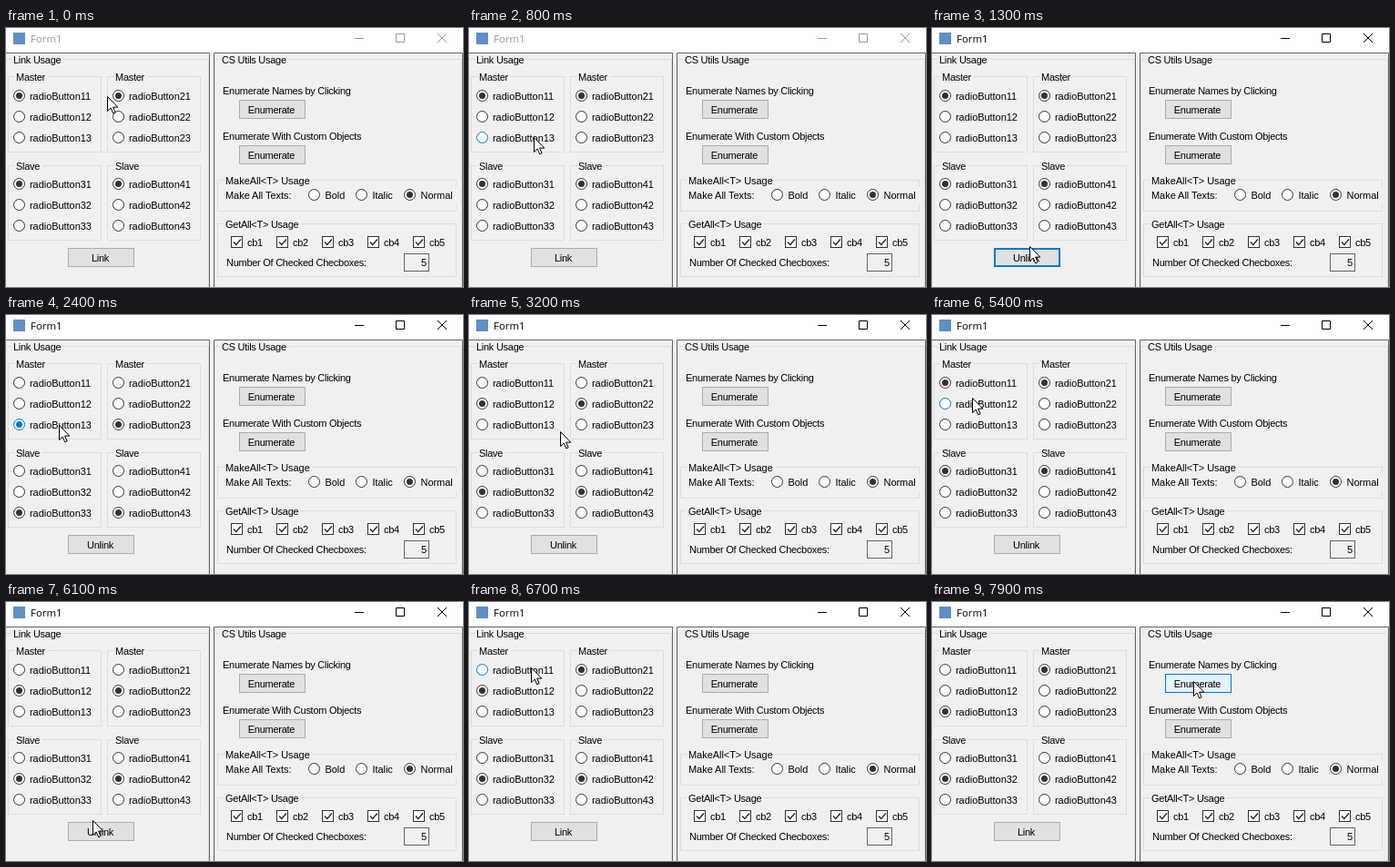
Recreate the animation shown at these times as an HTML page. Size 502 by 285 pixels, loop 8000 ms.

```html
<!DOCTYPE html>
<html lang="en">
<head>
<meta charset="utf-8">
<title>Form1</title>
<style>
  html, body { margin: 0; width: 100%; height: 100%; overflow: hidden; background: #f0f0f0; }
  svg { display: block; width: 502px; height: 285px; }
  text { font: 11px "Liberation Sans", Arial, sans-serif; letter-spacing: -.27px; fill: #000; white-space: pre; }
  .wide { letter-spacing: -.05px; }
  .title { font: 11.4px "Open Sans", "Noto Sans", sans-serif; letter-spacing: 0; }
  .legend { paint-order: stroke; stroke: #f0f0f0; stroke-width: 5px; }
  .mid { text-anchor: middle; }
  .line { fill: none; stroke: #dcdcdc; }
  .panel { fill: none; stroke: #646464; }
  .glyph { fill: none; stroke: #000; }
  .tick { fill: none; stroke: #222; stroke-width: 1.3px; }
  .inactive .title { fill: #999; }
  .inactive .glyph { stroke: #999; }
  .ring { fill: #fff; stroke: #333; }
  .dot { fill: #333; visibility: hidden; }
  .on .dot { visibility: visible; }
  .hot .ring { stroke: #0078d7; }
  .hot .dot { fill: #0078d7; }
  .face { fill: #e1e1e1; stroke: #adadad; }
  .hot .face { fill: #e5f1fb; stroke: #0078d7; }
  .halo { fill: none; stroke: #0078d7; stroke-width: 2px; visibility: hidden; }
  .focus:not(.hot) .halo { visibility: visible; }
  .cursor { fill: #fff; stroke: #000; }
</style>
</head>
<body>
<svg id="stage" viewBox="0 0 502 285"></svg>
<script>
const LOOP = 8000, STEP = 100;
const stage = document.getElementById('stage');

function add(tag, attrs, parent = stage) {
  const el = document.createElementNS('http://www.w3.org/2000/svg', tag);
  for (const k in attrs) el.setAttribute(k, attrs[k]);
  parent.append(el);
  return el;
}
const rect = (x, y, width, height, cls, parent) =>
  add('rect', { x: x + .5, y: y + .5, width, height, class: cls }, parent);
const path = (d, cls, parent) => add('path', { d, class: cls }, parent);
function label(str, x, y, cls = '', parent) {
  const el = add('text', { x, y, class: cls }, parent);
  el.textContent = str;
  return el;
}
function group(name, x, y, w, h, cls = '') {
  rect(x, y, w, h, 'line');
  label(name, x + 9, y + 5, 'legend ' + cls);
}
function radio(name, x, y, gap = 11.5) {
  const el = add('g', {});
  add('circle', { cx: x, cy: y, r: 6, class: 'ring' }, el);
  add('circle', { cx: x, cy: y, r: 3.5, class: 'dot' }, el);
  label(name, x + gap, y + 4.5, 'wide', el);
  return { el, x, y, box: [x - 7, y - 8, 86, 17] };
}
function button(name, x, y) {
  const el = add('g', {});
  rect(x, y, 72, 20, 'face', el);
  rect(x + .5, y + .5, 71, 19, 'halo', el);
  const text = label(name, x + 35.5, y + 14.5, 'mid', el);
  return { el, text, x, y: y + 9, box: [x, y, 73, 21] };
}

// Title bar
const bar = add('g', {});
add('rect', { width: 502, height: 27, fill: '#fff' }, bar);
add('rect', { x: 8, y: 5, width: 13, height: 13, fill: '#5f8fc4' }, bar);
label('Form1', 27, 16, 'title', bar);
path('M383 11.5h10M428.5 6.5h9v9h-9zM474 6l10 10M484 6l-10 10', 'glyph', bar);

// Panels
path('M0 34.5H222.5V285', 'line');
path('M229.5 285V34.5H500.5V285', 'line');
path('M0 27.5H223.5V285', 'panel');
path('M228.5 285V27.5H501.5V285', 'panel');
label('Link Usage', 8, 39, 'legend');
label('CS Utils Usage', 237, 39, 'legend');

// Left: two masters above two slaves
const groups = [];
for (let g = 0; g < 4; g++) {
  const col = g % 2, row = g >> 1;
  group(row ? 'Slave' : 'Master', 2 + col * 109, 53 + row * 98, 102, 83 - row);
  groups.push([0, 1, 2].map(i => Object.assign(
    radio(`radioButton${g + 1}${i + 1}`, 14.5 + col * 109, 74.5 + row * 97 + i * 23), { g, i })));
}
const [[r11, r12, r13], [r21], , [r41, , r43]] = groups;
const link = button('Link', 68, 242);

// Right: utilities
label('Enumerate Names by Clicking', 238, 73);
const names = button('Enumerate', 256, 79);
label('Enumerate With Custom Objects', 238, 123);
const objects = button('Enumerate', 256, 129);

group('MakeAll<T> Usage', 232, 167, 262, 34, 'wide');
add('rect', { x: 436, y: 175, width: 60, height: 19, fill: '#f0f0f0' });
label('Make All Texts:', 241, 188, 'wide');
radio('Bold', 338.5, 183.5, 12);
radio('Italic', 390.5, 183.5, 12);
radio('Normal', 443.5, 183.5, 12).el.classList.add('on');

group('GetAll<T> Usage', 232, 215, 262, 58);
for (let i = 0; i < 5; i++) {
  const x = 247 + i * 50;
  rect(x, 229, 12, 12, 'ring');
  path(`M${x + 3} 235.5l2.8 3 5.2-6`, 'tick');
  label('cb' + (i + 1), x + 18, 240);
}
label('Number Of Checked Checboxes:', 242, 262);
rect(437, 248, 27, 19, 'panel');
label('5', 456, 262);

const cursor = path('M0 0V16L3.7 12.5 6.2 18.3 8.6 17.2 6.1 11.6H11.3Z', 'cursor');
const widgets = [...groups.flat(), link, names, objects];

// The user's session: the pointer glides from stop to stop
const stops = [], clicks = [];
const move = (t, w, dx = 44, dy = 1) => stops.push({ t, x: w.x + dx, y: w.y + dy });
function click(t, w, dx) {
  move(t, w, dx);
  clicks.push({ t, w });
}
move(0, r21, -12);
move(600, r11);
click(1200, link);
click(1800, r12);
click(2400, r13);
click(2800, r12);
click(3700, r41, 38);
move(4100, r41, 40, 4);
click(4500, r43);
click(5000, r11, 36);
move(5400, r12, 30, -6);
click(5600, r12, 32);
click(6200, link, 32);
click(6500, r21, 30);
move(6700, r11, 54, -2);
click(6800, r11, 54);
click(7200, r13, 48);
move(7400, r13, 48);
move(7900, names, 32, 0);

function pointer(t) {
  const n = stops.findIndex(s => s.t > t);
  if (n < 0) return stops[stops.length - 1];
  const a = stops[n - 1], b = stops[n];
  const p = (t - a.t) / (b.t - a.t), e = p * p * (3 - 2 * p);
  return { x: a.x + (b.x - a.x) * e, y: a.y + (b.y - a.y) * e };
}

function stateAt(t) {
  const picked = [0, 0, 0, 0], done = clicks.filter(c => c.t <= t);
  let linked = false;
  for (const { w } of done) {
    if (w === link) linked = !linked;
    else if (!linked) picked[w.g] = w.i;
    else picked.fill(w.i, w.g < 2 ? 0 : 2);
  }
  return { picked, linked, last: done.length ? done[done.length - 1].w : null };
}

const inside = ([x, y, w, h], p) => p.x >= x && p.x < x + w && p.y >= y && p.y < y + h;

function draw(t) {
  const pos = pointer(t), { picked, linked, last } = stateAt(t);
  for (const w of widgets) {
    w.el.classList.toggle('on', picked[w.g] === w.i && w.g !== undefined);
    w.el.classList.toggle('hot', inside(w.box, pos));
  }
  link.el.classList.toggle('focus', last === link);
  link.text.textContent = linked ? 'Unlink' : 'Link';
  bar.classList.toggle('inactive', !last);
  cursor.setAttribute('transform', `translate(${Math.round(pos.x) - .5} ${Math.round(pos.y) - .5})`);
}

const start = performance.now();
let shown = -1;
function tick() {
  const t = Math.floor((performance.now() - start) % LOOP / STEP) * STEP;
  if (t !== shown) draw(shown = t);
  requestAnimationFrame(tick);
}
tick();
</script>
</body>
</html>
```
